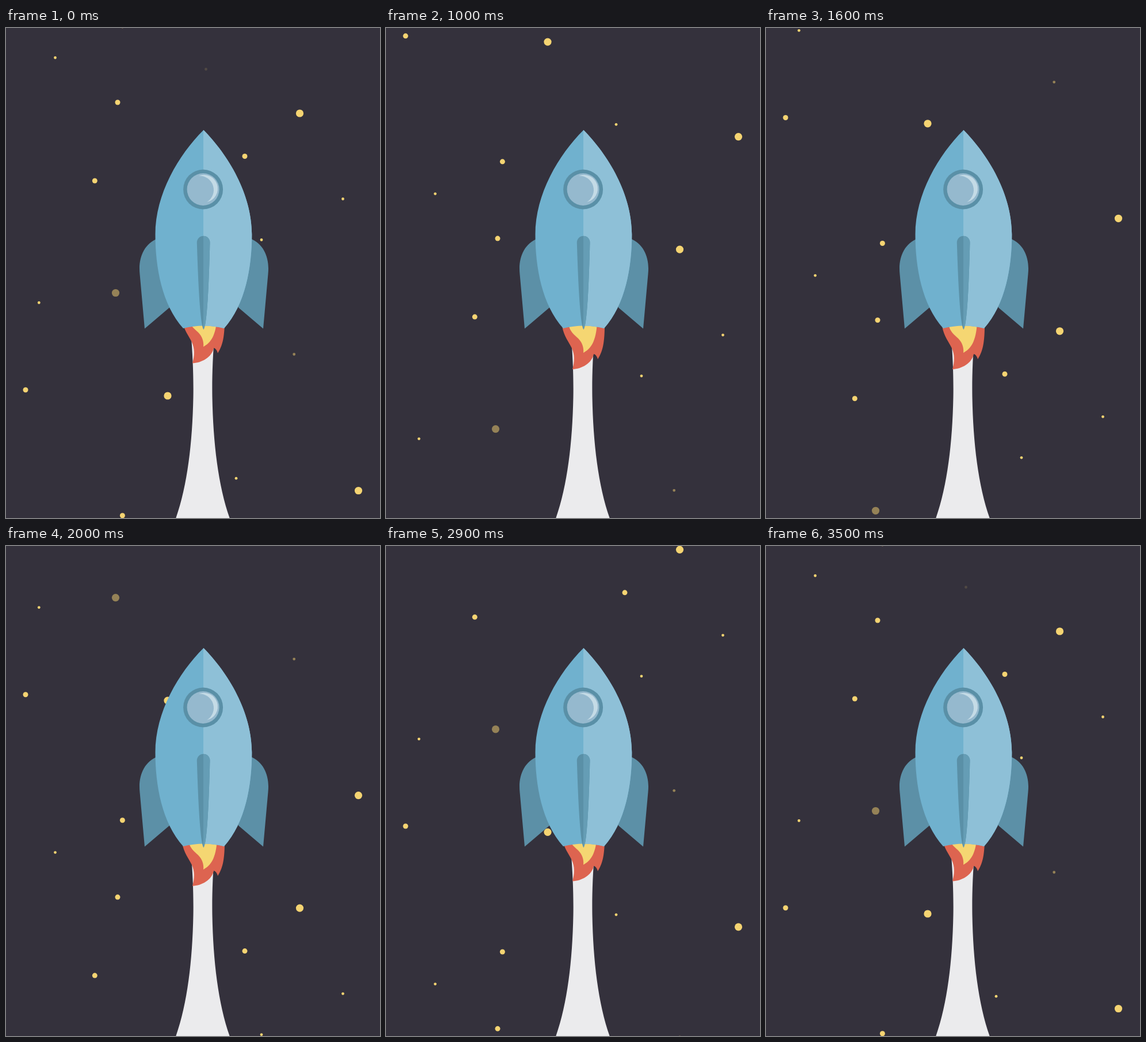
Animation of 650 by 850 pixels, one loop 3600 ms. Source, as an HTML page with a canvas:

```html
<!DOCTYPE html>
<html lang="en">
<head>
<meta charset="utf-8">
<title>Rocket</title>
<style>
  html, body { margin: 0; width: 100%; height: 100%; overflow: hidden; background: #34313c; }
  canvas { display: block; }
</style>
</head>
<body>
<canvas id="stage" width="650" height="850"></canvas>
<script>
const ctx = document.getElementById('stage').getContext('2d');
const W = 650, H = 850, LOOP = 3600, STEP = 100;

// x, y, radius, opacity
const stars = [
  [85.5, 51.5, 2.4], [347.5, 71.5, 2.4, 0.15], [194, 129, 4.5], [510.5, 148, 6.6],
  [415, 222.5, 4.5], [154.3, 265, 4.5], [585.5, 296.5, 2.4], [444, 367.5, 2.4],
  [190.5, 459.5, 6.6, 0.5], [57.3, 476.5, 2.4], [500.7, 566, 2.4, 0.5], [34, 627.7, 4.5],
  [281, 638, 6.6], [400, 781.2, 2.4], [612.5, 802.5, 6.6], [202.4, 845.7, 4.5]
];

const smoke = new Path2D(
  'M321 525C325 570 326 610 325.5 640C324 720 315 795 295 851' +
  'H389C369 795 360 720 358.5 640C358 610 359 570 363 525Z');
const redFlame = new Path2D(
  'M306 506C309 525 318 534 323 545C328 556 328 568 324 581.5' +
  'C340 581 358 571 361 555C365 556 367 560 368 564C375 553 380 540 380 506Z');
const yellowFlame = new Path2D(
  'M317 500C318 516 328 522 334 528C341 535 344 544 343 553C356 546 365 534 367 500Z');
const fin = new Path2D(
  'M264 365C242 373 232 395 232 417Q232 422 232.6 428L241 521.5L284 485L290 470Z');
const body = new Path2D(
  'M343.3 177C300 220 259.5 288 259.5 358C259.5 415 271 480 308 521' +
  'Q343.5 512 379 521C416 480 427.3 415 427.3 358C427.3 288 386 220 343.3 177Z');
const ridge = new Path2D(
  'M331.8 372A11.3 11.3 0 0 1 354.4 372C353 430 350 515 343.3 523C337 515 333.5 430 331.8 372Z');
const glint = new Path2D('M335 256.5A23.9 23.9 0 1 1 349 302A24.5 24.5 0 0 0 335 256.5Z');

function fill(path, color) {
  ctx.fillStyle = color;
  ctx.fill(path);
}

function disc(x, y, r, color) {
  ctx.fillStyle = color;
  ctx.beginPath();
  ctx.arc(x, y, r, 0, Math.PI * 2);
  ctx.fill();
}

// Left half in one colour, right half in another
function split(path, left, right) {
  fill(path, left);
  ctx.save();
  ctx.beginPath();
  ctx.rect(343, 0, W, H);
  ctx.clip();
  fill(path, right);
  ctx.restore();
}

// Steps of 100 ms, with three slightly longer ones in the second half
function phase(ms) {
  const k = Math.floor((ms % LOOP) / STEP);
  const skips = Math.round(3 * Math.min(1, Math.max(0, (k - 16) / 13)));
  return k * STEP + skips * STEP / 3;
}

function drawStars(time) {
  const shift = time / LOOP * H;
  for (const [x, y, r, alpha = 1] of stars) {
    const top = (y + shift) % H;
    ctx.globalAlpha = alpha;
    for (const wrap of [-H, 0, H]) disc(x, top + wrap, r, '#f5d472');
  }
  ctx.globalAlpha = 1;
}

function drawFlame(time) {
  const beat = 1 - Math.abs((time % 300) / 150 - 1);
  ctx.save();
  ctx.translate(0, 11.8 * (1 - (1 - beat) ** 2));
  fill(redFlame, '#dd6450');
  fill(yellowFlame, '#f5d672');
  ctx.restore();
}

function drawRocket() {
  fill(fin, '#5c90a7');
  ctx.save();
  ctx.translate(688, 0);
  ctx.scale(-1, 1);
  fill(fin, '#5c90a7');
  ctx.restore();
  split(body, '#70b1ce', '#8ec0d7');
  split(ridge, '#5a90a7', '#659db5');
  disc(342.6, 280, 34.5, '#5a90a7');
  disc(342.6, 280, 28, '#95b9ce');
  fill(glint, '#c4dbe6');
}

function draw(now) {
  const time = phase(now);
  ctx.fillStyle = '#34313c';
  ctx.fillRect(0, 0, W, H);
  drawStars(time);
  fill(smoke, '#ebebed');
  drawFlame(time);
  drawRocket();
}

let start;
function tick(now) {
  start ??= now;
  draw(now - start);
  requestAnimationFrame(tick);
}
draw(0);
requestAnimationFrame(tick);
</script>
</body>
</html>
```
